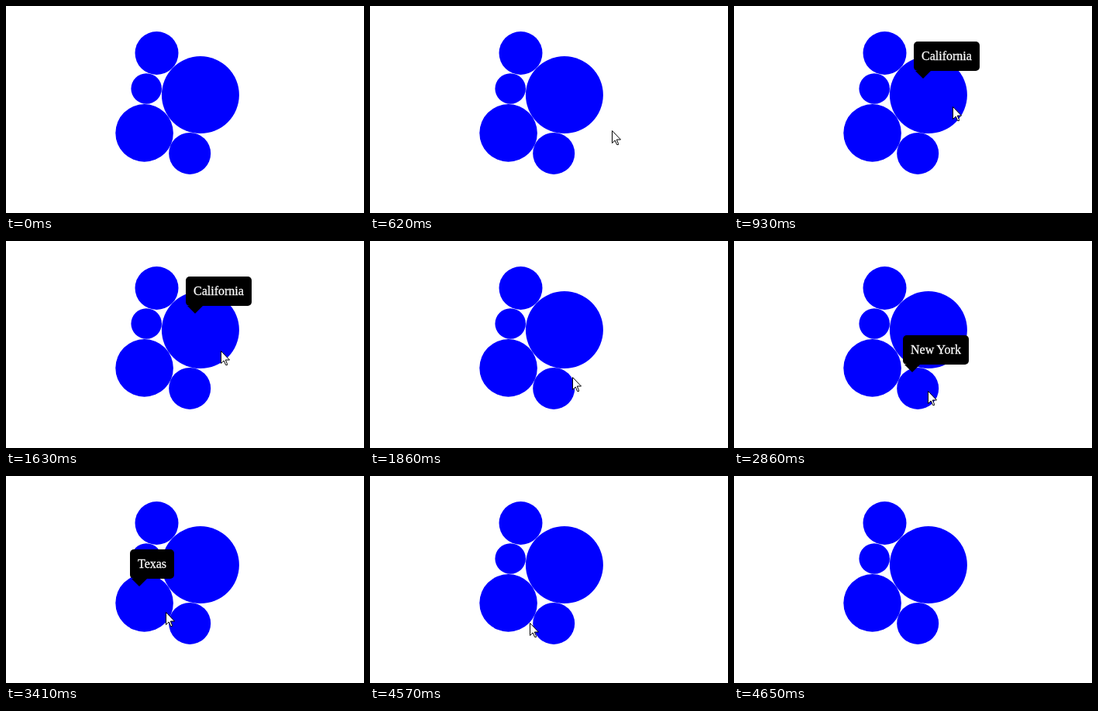
An HTML page for the animation above (5810 ms loop, 462x268 px).

```html
<!DOCTYPE html>
<html lang="en">
<head>
<meta charset="utf-8">
<title>Bubble tooltips</title>
<style>
  html, body { margin: 0; width: 100%; height: 100%; overflow: hidden; background: #fff; }
  svg { display: block; width: 462px; height: 268px; }
  text { font: 16px "Liberation Serif", "Times New Roman", serif; fill: #fff; stroke: #fff; stroke-width: .3; }
</style>
</head>
<body>
<svg viewBox="0 0 462 268">
  <g id="bubbles" fill="#00f"></g>
  <g id="tip">
    <rect id="box" height="38" rx="5"/>
    <path d="M2 38H22L12 48Z"/>
    <text id="label" x="10" y="24"></text>
  </g>
  <path id="cursor" d="M.5 .5V16.5L4.2 13L6.6 18.5H8.5V17.3L6.3 12H11.5Z"
        fill="#fff" stroke="#000" stroke-linejoin="round"/>
</svg>
<script>
const LOOP = 5810, STEPS = 75;
const LEAD = 8; // steps land slightly early, on whole hundredths of a second

const bubbles = [
  { x: 194.5, y: 61, r: 28 },
  { x: 181.2, y: 107, r: 19.8 },
  { x: 250.9, y: 115.1, r: 50, name: "California" },
  { x: 178.6, y: 164.4, r: 37.3, name: "Texas" },
  { x: 237.2, y: 190.9, r: 27, name: "New York" }
];

// The pointer glides between stops and rests at a stop until its "leave" step.
const stops = [
  { at: 5, x: 376, y: 250 },
  { at: 8, x: 312, y: 161 },
  { at: 12, leave: 20, x: 282, y: 130 },
  { at: 24, x: 261, y: 176 },
  { at: 29, leave: 36, x: 253, y: 194 },
  { at: 37, x: 250, y: 194 },
  { at: 41, x: 208, y: 176 },
  { at: 44, leave: 58, x: 206, y: 176 },
  { at: 59, x: 206, y: 190 }
];

const $ = id => document.getElementById(id);
const place = (el, x, y) => el.setAttribute("transform", `translate(${x} ${y})`);
const show = (el, on) => el.setAttribute("visibility", on ? "visible" : "hidden");
const mix = (a, b, k) => Math.round(a + (b - a) * k);

$("bubbles").innerHTML = bubbles
  .map(b => `<circle cx="${b.x}" cy="${b.y}" r="${b.r}"/>`).join("");

function pointerAt(step) {
  const next = stops.findIndex(s => s.at >= step);
  if (next < 0 || step < stops[0].at) return null;
  const to = stops[next], from = stops[next - 1] || to;
  const left = from.leave || from.at;
  const k = to === from ? 1 : Math.max(0, (step - left) / (to.at - left));
  return { x: mix(from.x, to.x, k), y: mix(from.y, to.y, k) };
}

function drawTip(bubble) {
  $("label").textContent = bubble.name;
  $("box").setAttribute("width", Math.round($("label").getComputedTextLength()) + 20);
  place($("tip"), Math.round(bubble.x - 19), Math.round(bubble.y - 69));
}

function render(time) {
  const pointer = pointerAt(Math.floor((time + LEAD) * STEPS / LOOP));
  const hit = pointer && bubbles.find(b =>
    b.name && Math.hypot(pointer.x - b.x, pointer.y - b.y) < b.r);

  show($("cursor"), pointer);
  if (pointer) place($("cursor"), pointer.x, pointer.y);
  show($("tip"), hit);
  if (hit) drawTip(hit);
}

const start = performance.now();
function tick() {
  render((performance.now() - start) % LOOP);
  requestAnimationFrame(tick);
}
tick();
</script>
</body>
</html>
```
